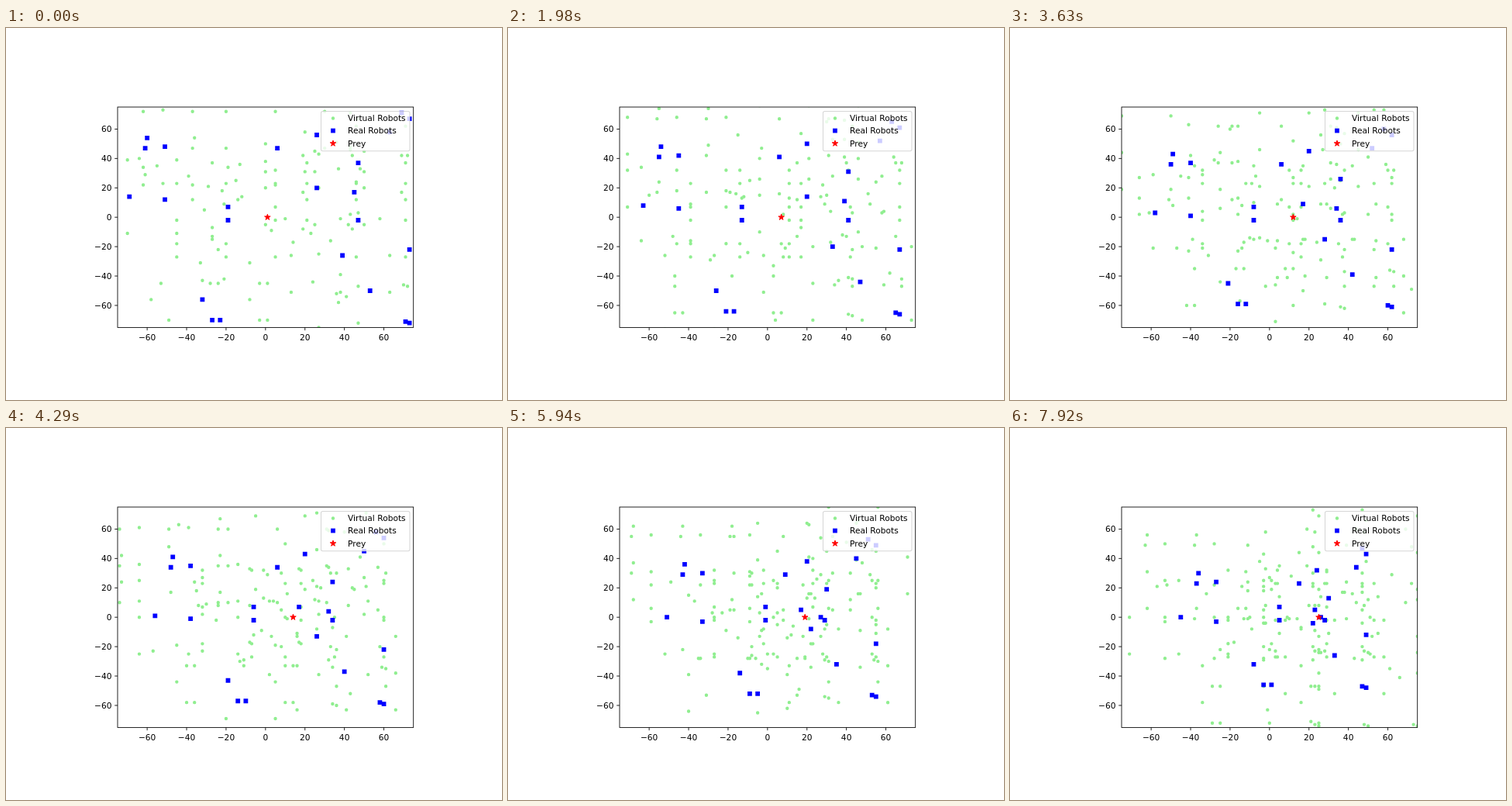
An HTML page for the animation above (8 s loop, 640 by 480 pixels).

```html
<!DOCTYPE html>
<html lang="en">
<head>
<meta charset="utf-8">
<title>Robots and prey</title>
<style>
  html, body { margin: 0; width: 100%; height: 100%; overflow: hidden; background: #fff; }
  svg { display: block; width: 640px; height: 480px; }
  text { font: 10.667px "DejaVu Sans", sans-serif; fill: #000; }
  .axis { fill: none; stroke: #000; stroke-width: .86; }
  .virtual { fill: #90ee90; }
  .real { fill: #00f; }
  .prey { fill: #f00; stroke: #f00; stroke-width: 1; stroke-linejoin: bevel; }
</style>
</head>
<body>
<svg viewBox="0 0 640 480">
  <clipPath id="area"><rect x="144" y="102" width="381.7" height="284.4"/></clipPath>
  <g clip-path="url(#area)">
    <path id="virtual" class="virtual"/>
    <path id="real" class="real"/>
    <path id="prey" class="prey"/>
  </g>
  <rect class="axis" x="144" y="102" width="381.7" height="284.4"/>
  <path id="ticks" class="axis"/>
  <g id="labels"></g>
  <rect x="406.5" y="107.5" width="114.5" height="51.2" rx="2.2" fill="#fff" fill-opacity=".8"
        stroke="#ccc" stroke-opacity=".8" stroke-width="1.07"/>
  <path id="keyVirtual" class="virtual"/>
  <path id="keyReal" class="real"/>
  <path id="keyPrey" class="prey"/>
  <text x="441" y="120">Virtual Robots</text>
  <text x="441" y="136.3">Real Robots</text>
  <text x="441" y="152.5">Prey</text>
</svg>
<script>
const STEP = 330, LOOP = 8000, LAST = 24, REACH = 25;
const byId = id => document.getElementById(id);
const draw = (id, d) => byId(id).setAttribute('d', d);
const px = x => 334.85 + x * 2.545;
const py = y => 244.2 - y * 1.896;

// Marker outlines
const dot = (x, y) => `M${x - 2.2} ${y}a2.2 2.2 0 1 0 4.4 0a2.2 2.2 0 1 0 -4.4 0z`;
const square = (x, y) => `M${x - 2.9} ${y - 2.9}h5.8v5.8h-5.8z`;
const star = (x, y) => {
  const points = [];
  for (let i = 0; i < 10; i++) {
    const r = i % 2 ? 1.5 : 3.95, a = i * Math.PI / 5;
    points.push(`${(x + r * Math.sin(a)).toFixed(2)} ${(y - r * Math.cos(a)).toFixed(2)}`);
  }
  return `M${points.join('L')}z`;
};
const place = (marker, [x, y]) => marker(px(x), py(y));

// Each robot closes in one unit per step and axis, until it rests.
// lag: farthest it lets the prey run ahead; wait: steps before it moves in y.
const robot = (x, y, rules) =>
  ({ x, y, restX: 20, restY: 0, lag: Infinity, wait: 0, ...rules });
const robots = [
  robot(-60, 54), robot(-61, 47), robot(-51, 48),
  robot(-32, -56), robot(-27, -70), robot(-23, -70),
  robot(73, 67), robot(73, -72), robot(71, -71),
  robot(-69, 14),
  robot(-51, 12, { restY: -3 }),
  robot(-19, 7, { restY: 7 }),
  robot(-19, -2, { restY: -2 }),
  robot(6, 47, { restX: 6, lag: 10 }),
  robot(26, 56, { lag: 1 }),
  robot(26, 20, { restX: 17, restY: 5, lag: 2 }),
  robot(45, 17, { restX: 26 }),
  robot(47, 37, { restX: 30 }),
  robot(47, -2, { restX: 28, restY: -2 }),
  robot(39, -26, { restX: 22, restY: -4 }),
  robot(53, -50, { restX: 33 }),
  robot(73, -22, { wait: 14 }),
  robot(69, 71, { restX: 47 }),
  robot(63, 58, { restX: 44 })
];
const preyAt = step => [step + 1, 0];
const approach = (from, to, steps) =>
  from + Math.sign(to - from) * Math.min(Math.max(steps, 0), Math.abs(to - from));

function position(r, step) {
  if (step < 0) return [r.x - 1, r.y];
  const x = Math.max(approach(r.x, r.restX, step), preyAt(step)[0] - r.lag);
  return [x, approach(r.y, r.restY, step - r.wait)];
}

function seeded(seed) {
  return () => {
    seed = seed + 0x6D2B79F5 | 0;
    let n = Math.imul(seed ^ seed >>> 15, seed | 1);
    n ^= n + Math.imul(n ^ n >>> 7, n | 61);
    return ((n ^ n >>> 14) >>> 0) / 4294967296;
  };
}

// Eight neighbours around each robot's last place; some are drawn to the prey
function virtualRobots(step) {
  const random = seeded(step * 977 + 5), found = [];
  const [preyX, preyY] = preyAt(step);
  for (const r of robots) {
    const [x, y] = position(r, step - 1);
    for (let i = 0; i < 9; i++) {
      if (i === 4) continue;
      const nx = x + (i % 3 - 1) * REACH;
      const ny = y + (Math.floor(i / 3) - 1) * REACH;
      const pull = random() < 0.22 ? random() * 0.6 : 0;
      found.push([
        Math.round(nx + (preyX - nx) * pull),
        Math.round(ny + (preyY - ny) * pull)
      ]);
    }
  }
  return found;
}

function drawStep(step) {
  draw('virtual', virtualRobots(step).map(p => place(dot, p)).join(''));
  draw('real', robots.map(r => place(square, position(r, step))).join(''));
  draw('prey', place(star, preyAt(step)));
}

function drawFrame() {
  let ticks = '', labels = '';
  for (let v = -60; v <= 60; v += 20) {
    const name = String(v).replace('-', '\u2212');
    ticks += `M${px(v)} 386.4v3.8M144 ${py(v)}h-3.8`;
    labels += `<text x="${px(v)}" y="402.5" text-anchor="middle">${name}</text>` +
              `<text x="136.6" y="${py(v) + 4}" text-anchor="end">${name}</text>`;
  }
  draw('ticks', ticks);
  byId('labels').innerHTML = labels;
  draw('keyVirtual', dot(422, 116.5));
  draw('keyReal', square(422, 132.5));
  draw('keyPrey', star(422, 149));
}

let shown = -1;
function tick() {
  const step = Math.min(LAST, Math.floor(performance.now() % LOOP / STEP));
  if (step !== shown) drawStep(shown = step);
  requestAnimationFrame(tick);
}
drawFrame();
tick();
</script>
</body>
</html>
```
